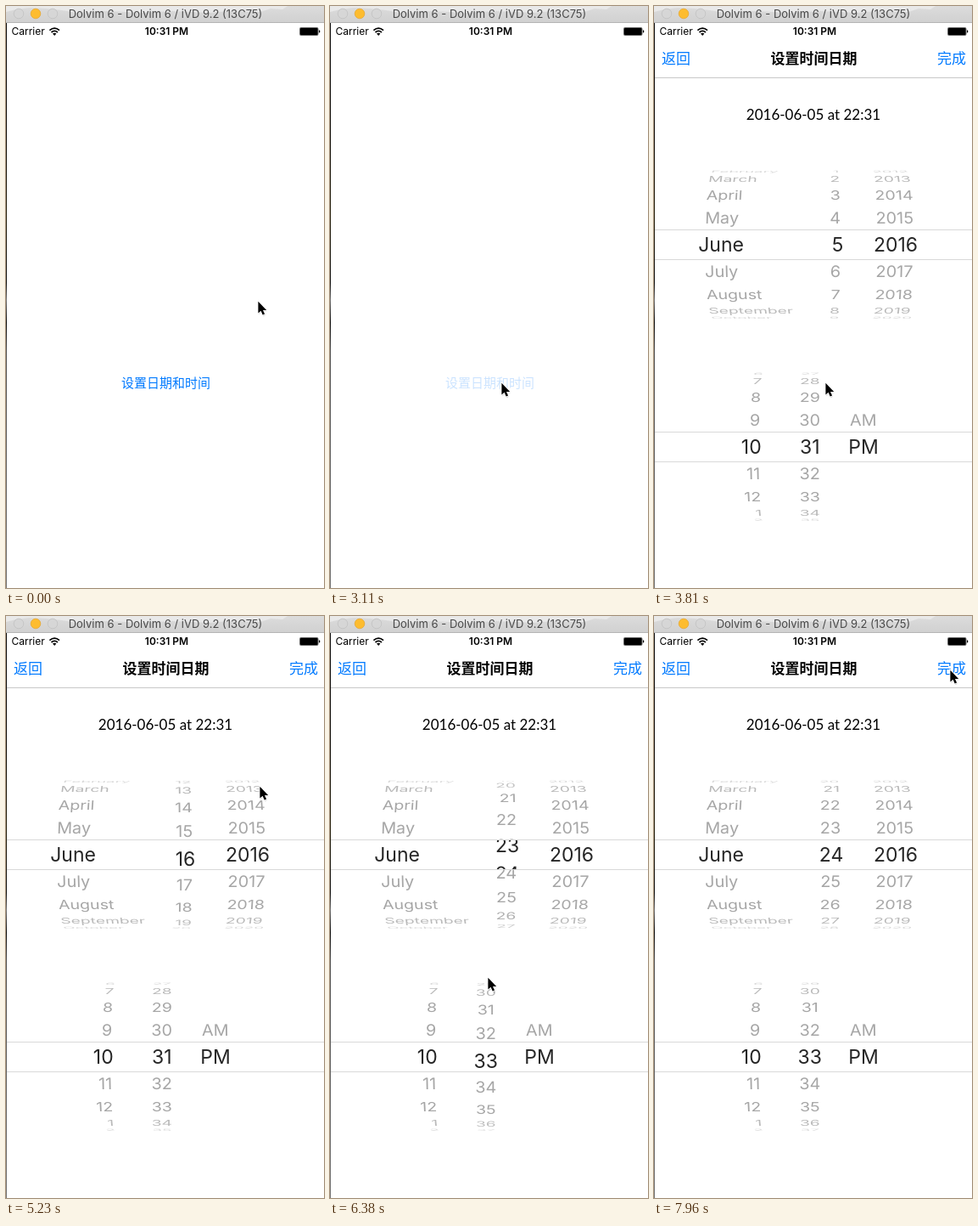
An HTML page for the animation above (8000 ms loop, 375 px wide and 685 px high).

```html
<!DOCTYPE html>
<html lang="zh-CN">
<head>
<meta charset="utf-8">
<title>Date and time picker</title>
<style>
  html, body { margin: 0; width: 100%; height: 100%; overflow: hidden; background: #fff; }
  svg { display: block; width: 375px; height: 685px; font-family: Inter, Roboto, sans-serif; }
  .cjk { font-family: "Noto Sans CJK SC", "Noto Sans CJK", sans-serif; }
  .blue { fill: #007aff; }
  .mid { text-anchor: middle; }
  .rule { fill: #d9d9d9; }
</style>
</head>
<body>
<svg viewBox="0 0 375 685">
  <defs>
    <linearGradient id="edge" x1="0" y1="20" x2="0" y2="685" gradientUnits="userSpaceOnUse">
      <stop offset="0" stop-color="#111"/>
      <stop offset=".2" stop-color="#14110c"/>
      <stop offset=".34" stop-color="#2c2612"/>
      <stop offset=".46" stop-color="#161616"/>
      <stop offset=".49" stop-color="#777"/>
      <stop offset=".53" stop-color="#111"/>
      <stop offset=".58" stop-color="#555"/>
      <stop offset="1" stop-color="#777"/>
    </linearGradient>
    <linearGradient id="bar" x1="0" y1="0" x2="0" y2="1">
      <stop offset="0" stop-color="#dcdcdc"/>
      <stop offset="1" stop-color="#d0d0d0"/>
    </linearGradient>
  </defs>

  <rect width="375" height="685" fill="#fff"/>
  <text id="open" class="cjk blue mid" x="188.5" y="448.7" font-size="15">设置日期和时间</text>

  <g id="sheet">
    <rect x="1" y="20" width="374" height="665" fill="#fff"/>
    <text class="cjk blue" x="9" y="68.4" font-size="17">返回</text>
    <text class="cjk mid" x="188.5" y="68.4" font-size="17" font-weight="700">设置时间日期</text>
    <text class="cjk blue" x="334" y="68.4" font-size="17">完成</text>
    <rect x="1" y="84" width="374" height="1" fill="#c8c8c8"/>
    <text class="mid" x="188" y="134.2" font-size="17" font-family="Lato, sans-serif">2016-06-05 at 22:31</text>
    <g id="wheels"></g>
  </g>

  <g id="status">
    <text x="6.5" y="34.4" font-size="12">Carrier</text>
    <g fill="none" stroke="#000" stroke-width="1.7">
      <path d="M51.4 28.7Q57.2 23.6 63 28.7"/>
      <path d="M53.5 31Q57.2 27.7 60.9 31"/>
    </g>
    <path d="M57.2 35L55 32.6Q57.2 30.9 59.4 32.6Z"/>
    <text class="mid" x="189.5" y="34.4" font-size="12" font-weight="600">10:31 PM</text>
    <rect x="346" y="25" width="22.5" height="10" rx="2" fill="#666"/>
    <rect x="347" y="26" width="20.5" height="8" rx="1"/>
    <path d="M369 28.3Q370.4 28.6 370.4 30T369 31.7Z"/>
  </g>

  <g id="titlebar">
    <rect width="375" height="20" fill="url(#bar)"/>
    <path d="M0 0H332L326 4L312 3L300 7L262 6L240 8L196 6L160 8L120 6L84 8L66 5L48 3L28 2L12 4L0 7Z" fill="#e9e9e9"/>
    <rect y="19" width="375" height="1" fill="#b5b5b5"/>
    <g fill="#d6d6d6" stroke="#c2c2c2" stroke-width=".8">
      <circle cx="15" cy="9" r="5.8"/>
      <circle cx="55" cy="9" r="5.8"/>
      <circle cx="35" cy="9" r="5.8" fill="#fdbc2f" stroke="#e6a935"/>
    </g>
    <text class="mid" x="188" y="14" font-size="13" fill="#484848">Dolvim 6 - Dolvim 6 / iVD 9.2 (13C75)</text>
  </g>
  <rect y="20" width="1" height="665" fill="url(#edge)"/>

  <g id="cursor">
    <path d="M.6 1V15L3.8 12.1L6 17L8.4 16L6.3 11.3H10.6Z" transform="translate(.4 1)" fill="#000" opacity=".22"/>
    <path d="M.4 .8V14.6L3.6 11.7L5.7 16.5L8.1 15.5L6 10.9H10.2Z" fill="#000" stroke="#fff" stroke-width="1.8" paint-order="stroke"/>
  </g>
</svg>

<script>
const LOOP = 8000, STEP = 88.44, AXIS = 188;
const RADIUS = 93, PITCH = 20 * Math.PI / 180, DEPTH = 0.077;
const NS = "http://www.w3.org/2000/svg";
const $ = id => document.getElementById(id);

const add = (parent, tag, attrs) => {
  const el = document.createElementNS(NS, tag);
  for (const k in attrs) el.setAttribute(k, attrs[k]);
  parent.appendChild(el);
  return el;
};

const MONTHS = ["January", "February", "March", "April", "May", "June", "July",
  "August", "September", "October", "November", "December"];
const mod = (i, n) => ((i % n) + n) % n;
const month = i => MONTHS[mod(i - 1, 12)];
const day = i => mod(i - 1, 31) + 1;
const hour = i => mod(i - 1, 12) + 1;
const minute = i => String(mod(i, 60)).padStart(2, "0");
const half = i => ["AM", "PM"][i] || "";

// Two layers per picker: grey drum outside the band, enlarged rows inside it
function picker(id, cy) {
  const root = $("wheels"), top = cy - 88, band = cy - 17;
  const outer = add(root, "clipPath", { id: id + "Out" });
  add(outer, "rect", { x: 0, y: top, width: 375, height: band - top });
  add(outer, "rect", { x: 0, y: band + 34, width: 375, height: 88 - 17 });
  const inner = add(root, "clipPath", { id: id + "In" });
  add(inner, "rect", { x: 0, y: band, width: 375, height: 34 });
  const dim = add(root, "g", { "clip-path": `url(#${id}Out)`, fill: "#a6a6a6" });
  const big = add(root, "g", { "clip-path": `url(#${id}In)`, fill: "#262626" });
  for (const y of [band - 1, band + 34])
    add(root, "rect", { class: "rule", x: 1, y, width: 374, height: 1 });
  return { cy, dim, big };
}

// dimX and bigX are the anchor positions of the two layers
function column(pick, label, anchor, dimX, bigX, lean) {
  const layer = (parent, size, x, reach, grow) => {
    const rows = [];
    for (let i = -reach; i <= reach; i++)
      rows.push(add(parent, "text", { "text-anchor": anchor, "font-size": size, y: size * 0.364 }));
    return { rows, x, reach, grow };
  };
  const layers = [layer(pick.dim, 20, dimX, 5, 1), layer(pick.big, 23, bigX, 1, 1.04)];
  let last = null;
  return pos => {
    if (pos === last) return;
    last = pos;
    const base = Math.round(pos);
    for (const { rows, x, reach, grow } of layers) {
      rows.forEach((el, k) => {
        const item = base + k - reach, a = (item - pos) * PITCH;
        const shown = Math.abs(a) < 1.53;
        el.textContent = shown ? label(item) : "";
        if (!shown) return;
        const s = 1 / (1 + DEPTH * (1 - Math.cos(a)));
        const skew = -lean * DEPTH * Math.sin(a) * s * s / RADIUS;
        const px = AXIS + (x - AXIS) * s;
        const py = pick.cy + RADIUS * grow * Math.sin(a) * s;
        el.setAttribute("transform", `matrix(${s} 0 ${skew} ${Math.cos(a) * s} ${px} ${py})`);
        el.setAttribute("opacity", Math.min(1, 1 - (Math.abs(a) - 0.8) / 1.1));
      });
    }
  };
}

const date = picker("date", 281), time = picker("time", 519);
column(date, month, "start", 59.5, 52.2, -100)(6);
const setDay = column(date, day, "end", 220.3, 223.3, 20);
column(date, i => i, "start", 261.8, 258.9, 97)(2016);
column(time, hour, "end", 125, 126.7, -72)(10);
const setMinute = column(time, minute, "middle", 183.7, 183.8, -4);
column(time, half, "start", 231, 229.2, 58)(1);

// Keys: step, values...
const CURSOR = [[6, 297, 347], [16, 204, 442], [17, 202, 443], [44, 202, 443],
  [47, 196, 298], [50, 196, 298], [53, 198, 262], [54, 198, 262], [55, 202, 245],
  [59, 299, 200], [60, 297, 204], [64, 178, 484], [65, 178, 484], [72, 186, 425],
  [74, 186, 425], [83, 332, 214], [84, 332, 214], [90, 349, 63]];
const MINUTES = [[65, 31], [72, 32.87], [78, 33]];
const DAYS = [[50, 5], [53, 6.1]];

function at(keys, n) {
  if (n <= keys[0][0]) return keys[0].slice(1);
  for (let i = 1; i < keys.length; i++) {
    const a = keys[i - 1], b = keys[i];
    if (n > b[0]) continue;
    const p = (n - a[0]) / (b[0] - a[0]), e = p * p * (3 - 2 * p);
    return a.slice(1).map((v, j) => v + (b[j + 1] - v) * e);
  }
  return keys[keys.length - 1].slice(1);
}

function dayAt(n) {
  if (n < 55) return at(DAYS, n)[0];
  if (n >= 80) return 24;
  if (n > 72) return 24 - 0.65 * ((80 - n) / 8) ** 2;
  return 24 - 17.7 * Math.exp(-(n - 55) * STEP / 455);
}

function slideAt(n) {
  if (n < 37) return 665;
  if (n >= 43) return 0;
  const w = (n - 36.5) * 1.61;
  return 665 * (1 + w) * Math.exp(-w);
}

function draw(t) {
  const n = Math.floor((t + 8) / STEP);
  const [x, y] = at(CURSOR, n);
  $("cursor").setAttribute("transform", `translate(${x} ${y})`);
  $("sheet").setAttribute("transform", `translate(0 ${slideAt(n)})`);
  $("open").setAttribute("opacity", n === 35 ? 0.2 : n === 36 ? 0.6 : 1);
  setDay(dayAt(n));
  setMinute(at(MINUTES, n)[0]);
}

const start = performance.now();
function tick() {
  draw((performance.now() - start) % LOOP);
  requestAnimationFrame(tick);
}
tick();
</script>
</body>
</html>
```
